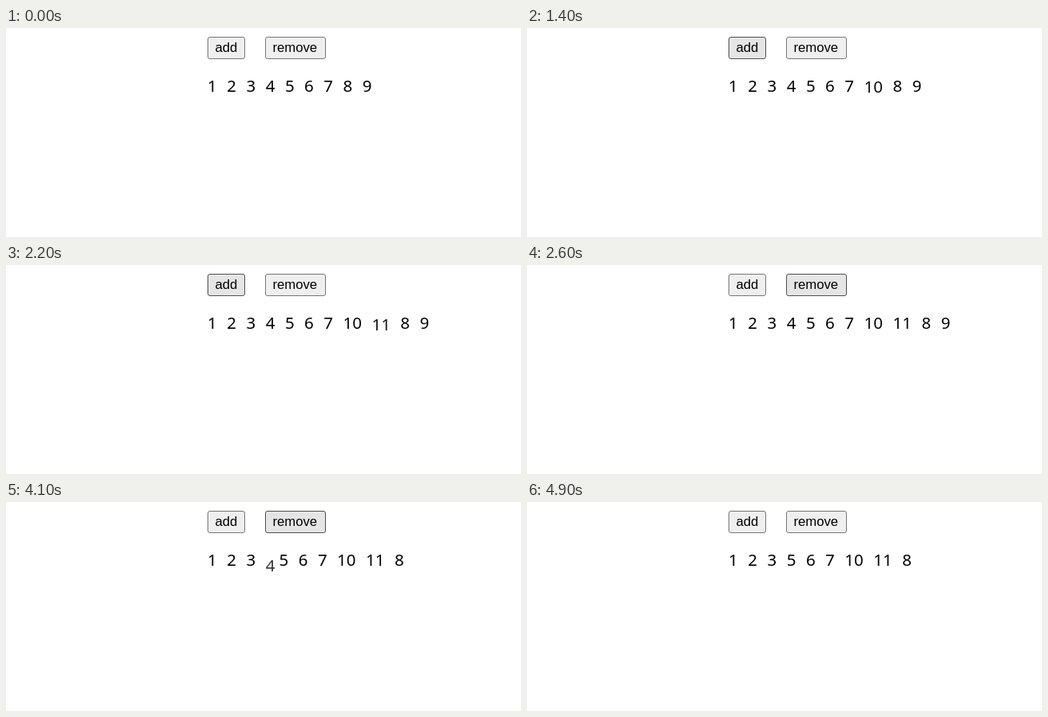
Write an HTML page with a canvas that moves like this. It is 644 px wide and 262 px high and loops after 5.5 s.

```html
<!DOCTYPE html>
<html lang="en">
<head>
<meta charset="utf-8">
<title>List transition</title>
<style>
  html, body { margin: 0; width: 100%; height: 100%; overflow: hidden; background: #fff; }
  canvas { display: block; }
</style>
</head>
<body>
<canvas id="stage" width="644" height="262"></canvas>
<script>
const ctx = document.getElementById('stage').getContext('2d', { alpha: false });

const LOOP = 5500;
const FADE = 800;   // enter and leave
const MOVE = 600;   // neighbours closing or opening a gap
const LEFT = 252, BASE = 80, DROP = 37.5;
const DIGIT = 11.72, GAP = 12.5;

const START = [1, 2, 3, 4, 5, 6, 7, 8, 9];
const OPS = [
  { at: 790, add: 10, index: 7 },
  { at: 1645, add: 11, index: 8 },
  { at: 2970, remove: 9 },
  { at: 3978, remove: 4 }
];

const LOOKS = {
  idle: ['#efefef', '#767676'],
  hover: ['#e5e5e5', '#4f4f4f'],
  press: ['#f5f5f5', '#8d8d8d']
};
const BUTTONS = [
  { label: 'add', x: 252, w: 47, hover: [300, 2500], press: [[700, 790], [1550, 1645]] },
  { label: 'remove', x: 324, w: 76, hover: [2600, 4900], press: [[2800, 2970], [3900, 3978]] }
];

const within = (t, [a, b]) => t >= a && t < b;
const bezier = (a, b, s) => 3 * a * s * (1 - s) ** 2 + 3 * b * s * s * (1 - s) + s ** 3;

// CSS "ease": cubic-bezier(.25, .1, .25, 1)
function ease(p) {
  if (p <= 0) return 0;
  if (p >= 1) return 1;
  let lo = 0, hi = 1;
  for (let i = 0; i < 24; i++) {
    const mid = (lo + hi) / 2;
    if (bezier(0.25, 0.25, mid) < p) lo = mid; else hi = mid;
  }
  return bezier(0.1, 1, lo);
}

function layout(list) {
  const spots = new Map();
  let x = LEFT;
  for (const n of list) {
    spots.set(n, x);
    x += String(n).length * DIGIT + GAP;
  }
  return spots;
}

function apply(list, op) {
  if (op.remove) return list.filter(n => n !== op.remove);
  const next = list.slice();
  next.splice(op.index, 0, op.add);
  return next;
}

function drawNumber(n, x, shown = 1) {
  ctx.globalAlpha = shown;
  ctx.fillText(n, x, BASE + (1 - shown) * DROP);
  ctx.globalAlpha = 1;
}

function drawList(t) {
  let before = START, after = START, last = null;
  for (const op of OPS) {
    if (t < op.at) break;
    before = after;
    after = apply(before, op);
    last = op;
  }
  const from = layout(before), to = layout(after);
  const fade = last ? ease((t - last.at) / FADE) : 1;
  const move = last ? ease((t - last.at) / MOVE) : 1;

  ctx.font = '20.4px "Noto Sans", "Open Sans", sans-serif';
  ctx.fillStyle = '#000';
  for (const [n, x] of to) {
    if (from.has(n)) drawNumber(n, from.get(n) + (x - from.get(n)) * move);
    else drawNumber(n, x, fade);
  }
  if (last && last.remove && fade < 1) drawNumber(last.remove, from.get(last.remove), 1 - fade);
}

function drawButton(b, t) {
  const state = b.press.some(span => within(t, span)) ? 'press' : within(t, b.hover) ? 'hover' : 'idle';
  const [fill, line] = LOOKS[state];
  ctx.beginPath();
  ctx.roundRect(b.x + 0.5, 11.5, b.w - 1, 27, 2.5);
  ctx.fillStyle = fill;
  ctx.fill();
  ctx.strokeStyle = line;
  ctx.lineWidth = 1;
  ctx.stroke();
  ctx.font = '16.67px "Liberation Sans", Arial, sans-serif';
  ctx.fillStyle = '#000';
  ctx.fillText(b.label, b.x + 9.5, 30);
}

function frame() {
  const t = performance.now() % LOOP;
  ctx.fillStyle = '#fff';
  ctx.fillRect(0, 0, 644, 262);
  for (const b of BUTTONS) drawButton(b, t);
  drawList(t);
  requestAnimationFrame(frame);
}
frame();
</script>
</body>
</html>
```
